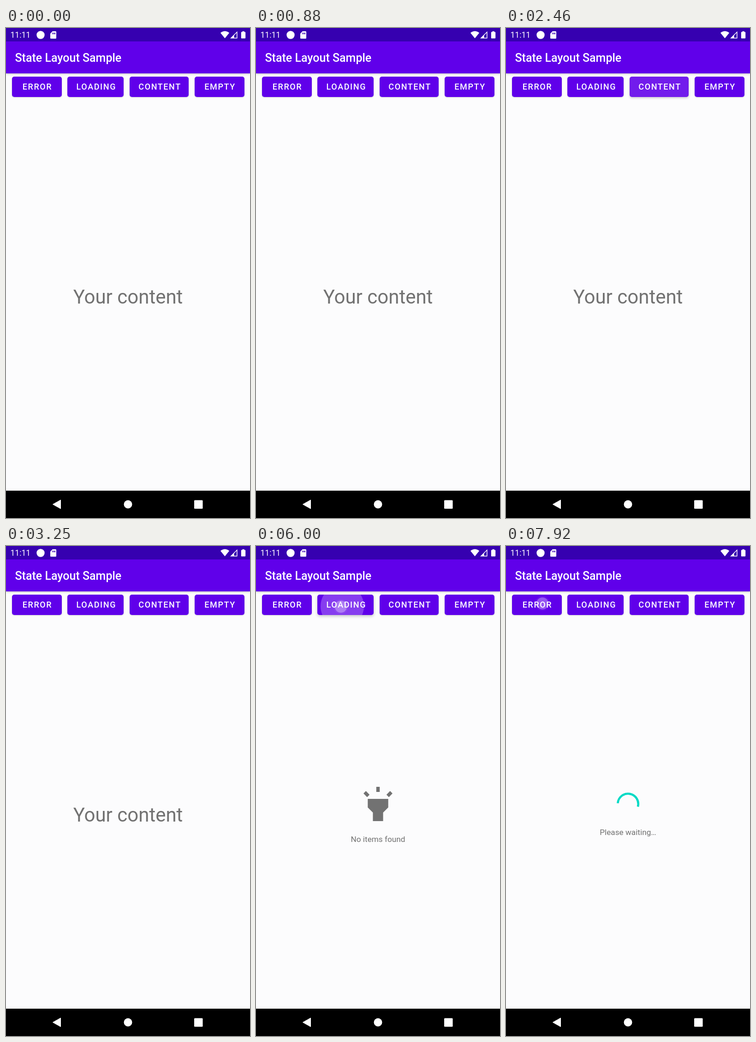
An HTML page that plays this animation: 529x1058 px, repeating every 8000 ms.

```html
<!DOCTYPE html>
<html lang="en">
<head>
<meta charset="utf-8">
<title>State Layout Sample</title>
<style>
  html, body { margin: 0; width: 100%; height: 100%; overflow: hidden; }
  body { position: relative; background: #fcfcfd; font-family: Roboto, sans-serif; }
  .bar { position: absolute; left: 0; top: 0; width: 529px; height: 98px; background: #6000ea;
         box-shadow: 0 1px 4px rgba(0, 0, 0, .28); }
  .btn { position: absolute; top: 105.3px; height: 44.2px; line-height: 44.6px; border-radius: 5px;
         background: #6000ea; overflow: hidden; box-sizing: border-box; padding-left: 3px;
         text-align: center; color: #fff; font-size: 18px; font-weight: 500; letter-spacing: 1.6px; }
  .btn i { position: absolute; width: 0; height: 0; border-radius: 50%; background: #fff; }
  .btn span { position: relative; }
  svg { position: absolute; left: 0; top: 0; }
  .view { fill: #727272; text-anchor: middle; }
</style>
</head>
<body>
<div class="bar"></div>
<div id="buttons"></div>
<svg width="529" height="1058" viewBox="0 0 529 1058">
  <rect width="529" height="29" fill="#3600b0"/>
  <g fill="#fff">
    <text x="9.5" y="21" font-size="17.5">11:11</text>
    <circle cx="75" cy="15" r="8.7"/>
    <path fill-rule="evenodd" d="M101 7h6.5q1.5 0 1.5 1.5v13q0 1.500-1.500 1.500h-10q-1.500 0-1.500-1.500v-9.500z
      M100.500 10v3.500h1.500v-3.500z M103 10v3.500h1.500v-3.500z M105.500 10v3.500h1.500v-3.500z"/>
    <path d="M465 10.500q9.500-7.500 19 0l-9.500 11.700z"/>
    <path fill-rule="evenodd" d="M501.500 7v15.500h-15.500z M500 10.600l-5.500 5.500v5h5.500z"/>
    <path d="M512.500 8.500v-1.500h4v1.500h1.500q1.200 0 1.200 1.200v11.600q0 1.200-1.200 1.200h-7q-1.200 0-1.200-1.200v-11.600q0-1.200 1.200-1.200z"/>
    <text x="19.500" y="73" font-size="25" font-weight="500">State Layout Sample</text>
  </g>
  <g id="content" class="view">
    <text x="264.500" y="595" font-size="42">Your content</text>
  </g>
  <g id="empty" class="view">
    <path transform="translate(220.100 512.600) scale(3.7)" d="M6 14l3 3v5h6v-5l3-3V9H6z M11 2h2v3h-2z
      M3.500 5.875L4.914 4.460l2.120 2.122L5.620 7.997z M16.960 6.585l2.123-2.120 1.414 1.414L18.375 8z"/>
    <text x="264.500" y="639" font-size="17.200">No items found</text>
  </g>
  <g id="loading" class="view">
    <path id="arc" fill="none" stroke="#03dac5" stroke-width="4.700"/>
    <text x="264.500" y="624" font-size="17.200">Please waiting…</text>
  </g>
  <g id="dot">
    <circle r="16" fill="#fff" opacity=".05"/>
    <circle r="13" fill="#fff" opacity=".3"/>
  </g>
  <rect y="999" width="529" height="59"/>
  <g fill="#fff">
    <path d="M101.500 1028.500L118.500 1019v19z" stroke="#fff" stroke-linejoin="round"/>
    <circle cx="264.500" cy="1028.500" r="9"/>
    <rect x="408" y="1019.500" width="18.500" height="18.500" rx="1.500"/>
  </g>
</svg>
<script>
const LOOP = 8000, TOP = 105.3;
const $ = id => document.getElementById(id);
const clamp = v => Math.max(0, Math.min(1, v));

// The screen refreshes only at these moments.
const ticks = [0, 2130, 2330, 2460, 2580, 4000, 4130, 4250, 4330, 4500, 4630, 5750, 5880, 6000, 6250,
  6380, 6500, 6670, 6790, 6960, 7130, 7290, 7460, 7580, 7750, 7920];

// down: finger appears, start: ripple begins, up: release
const buttons = [
  { label: 'ERROR', x: 12.5, w: 108, tap: [79, 124], down: 7460, start: LOOP, up: LOOP },
  { label: 'LOADING', x: 133.3, w: 122, tap: [184, 131], down: 5750, start: 5800, up: 6250 },
  { label: 'CONTENT', x: 268.3, w: 127.5, tap: [330, 130], down: 2130, start: 2040, up: 2330 },
  { label: 'EMPTY', x: 408.5, w: 108, tap: [463, 128], down: 4000, start: 4080, up: 4330 }
];

for (const b of buttons) {
  b.el = document.createElement('div');
  b.el.className = 'btn';
  b.el.style.left = b.x + 'px';
  b.el.style.width = b.w + 'px';
  b.el.innerHTML = `<i></i><span>${b.label}</span>`;
  b.ripple = b.el.firstChild;
  $('buttons').append(b.el);
}

function drawButton(b, t) {
  const on = t >= b.start;
  const fade = on ? clamp(1 - (t - b.up) / 240) : 0;
  const r = on ? Math.min(140, 0.235 * (t - b.start)) : 0;
  const lift = clamp((t - b.start - 80) / 170) * fade;
  const s = b.ripple.style;
  s.left = b.tap[0] + 3 - b.x - r + 'px';
  s.top = b.tap[1] - 1 - TOP - r + 'px';
  s.width = s.height = 2 * r + 'px';
  s.opacity = 0.24 * fade;
  b.el.style.boxShadow = `0 ${1 + 2 * lift}px ${3 + 5 * lift}px rgba(0,0,0,${0.16 + 0.1 * lift})`;
}

// Value at x of a cubic easing through p0..p3, each [x, y].
function bezier(p, x) {
  const at = (u, k) => p[0][k] * (1 - u) ** 3 + 3 * p[1][k] * u * (1 - u) ** 2
    + 3 * p[2][k] * u * u * (1 - u) + p[3][k] * u ** 3;
  let lo = 0, hi = 1;
  for (let i = 0; i < 24; i++) {
    const mid = (lo + hi) / 2;
    if (at(mid, 0) < x) lo = mid; else hi = mid;
  }
  return at(lo, 1);
}
const trimStart = p => p < 0.5 ? 0 : bezier([[0.5, 0], [0.7, 0], [0.6, 1], [1, 1]], p);
const trimEnd = p => p < 0.5
  ? bezier([[0, 0], [0.2, 0], [0.1, 1], [0.5, 0.96]], p)
  : bezier([[0.5, 0.96], [0.966, 0.993], [1, 1], [1, 1]], p);

function drawSpinner(t) {
  const age = Math.max(0, t - 6281), p = age % 1333 / 1333;
  const turn = age * 720 / 4444 + 90 * p - 12;
  const a = turn + 270 * trimStart(p), b = Math.max(a + 4, turn + 270 * trimEnd(p));
  const point = deg => {
    const rad = deg * Math.PI / 180;
    return `${264.5 + 22.2 * Math.sin(rad)} ${557 - 22.2 * Math.cos(rad)}`;
  };
  $('arc').setAttribute('d', `M${point(a)}A22.2 22.2 0 ${b - a > 180 ? 1 : 0} 1 ${point(b)}`);
}

function draw(now) {
  const time = now % LOOP;
  const t = ticks.findLast(v => v <= time);
  const view = t < 4500 ? 'content' : t < 6250 ? 'empty' : 'loading';
  for (const id of ['content', 'empty', 'loading']) $(id).style.display = id === view ? '' : 'none';
  buttons.forEach(b => drawButton(b, t));
  const held = buttons.find(b => t >= b.down && t < b.up);
  $('dot').style.display = held ? '' : 'none';
  if (held) $('dot').setAttribute('transform', `translate(${held.tap})`);
  drawSpinner(t);
}

const begin = performance.now();
function loop() {
  draw(performance.now() - begin);
  requestAnimationFrame(loop);
}
loop();
</script>
</body>
</html>
```
